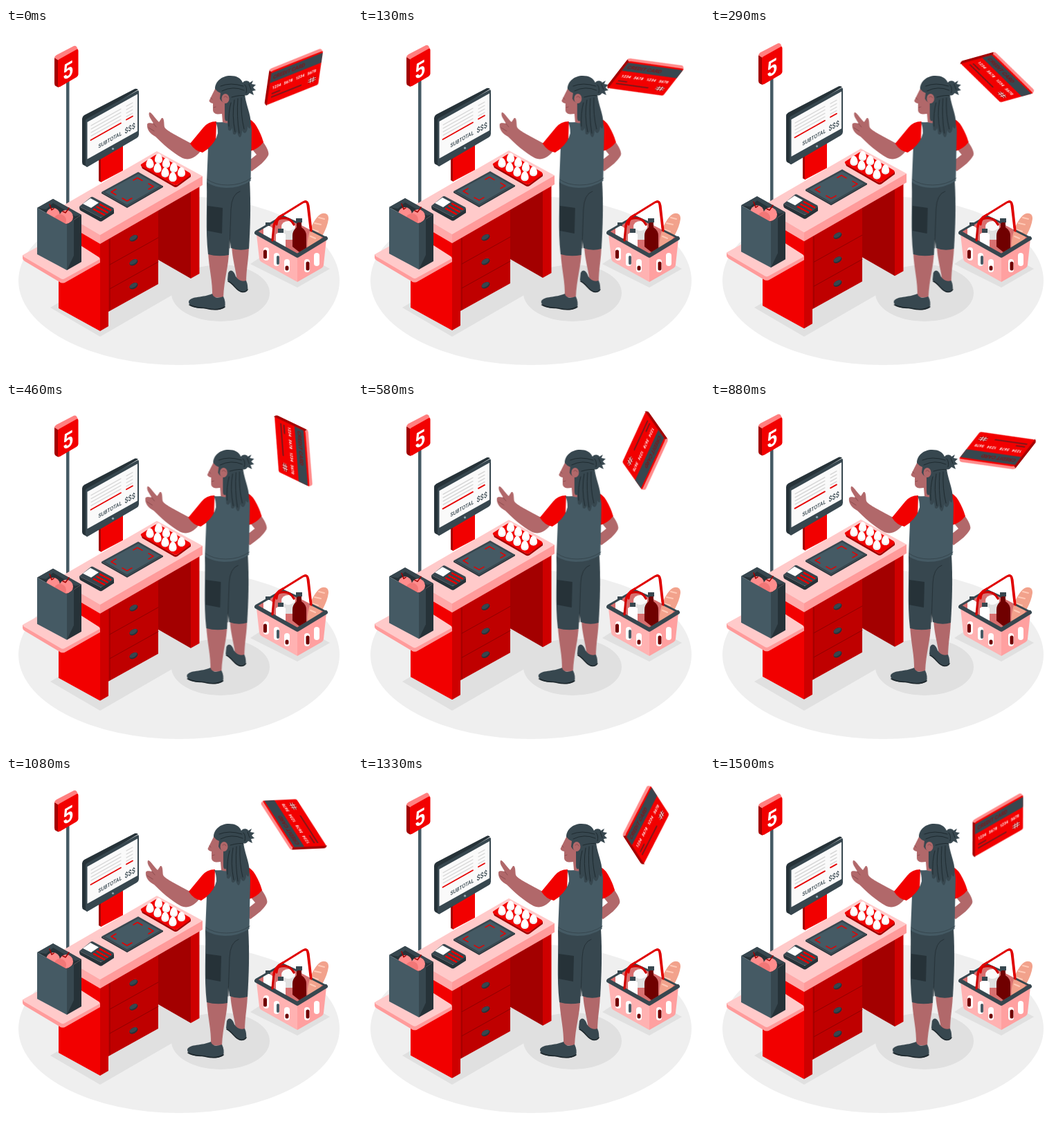
Write an HTML page without scripts that moves like this. It is 500x500 px and loops after 1.54 s.

```html
<!DOCTYPE html>
<html lang="en">
<head>
<meta charset="utf-8">
<title>Checkout</title>
<style>
  html, body { margin: 0; width: 100%; height: 100%; overflow: hidden; background: #fff; }
  svg { display: block; width: 100%; height: 100%; }
  text { font-family: Roboto, "Liberation Sans", sans-serif; }
  .red { fill: #f20000; }
  .deep { fill: #ce0000; }
  .dark { fill: #a30000; }
  .pale { fill: #ffcaca; }
  .pink { fill: #ff9b9b; }
  .slate { fill: #455a64; }
  .steel { fill: #37474f; }
  .ink { fill: #263238; }
  .skin { fill: #b1686a; }
  .shade { fill: #e0e0e0; }
  .white { fill: #fff; }
  .line { fill: none; stroke-linecap: round; stroke-linejoin: round; }
  .desk, .person, .card { animation: 1540ms linear infinite; }
  .desk { animation-name: float; }
  .person { animation-name: sway; }
  .card { animation-name: spin; }
  @keyframes float {
    0%, 100% { transform: translateY(0); }
    8% { transform: translateY(-.9px); }
    18.8% { transform: translateY(-3.7px); }
    29.9% { transform: translateY(-6.2px); }
    46.1% { transform: translateY(-9.2px); }
    52% { transform: translateY(-9.4px); }
    70.1% { transform: translateY(-5px); }
    86.4% { transform: translateY(-1.3px); }
    97.4% { transform: translateY(-.1px); }
  }
  @keyframes sway {
    0%, 100% { transform: translateX(0); }
    18.8% { transform: translateX(1.6px); }
    29.9% { transform: translateX(-2.6px); }
    46.1% { transform: translateX(-4px); }
    70.1% { transform: translateX(-2px); }
    86.4% { transform: translateX(-1px); }
  }
  @keyframes spin {
    0% { transform: rotate(8deg); }
    18.8% { transform: rotate(74deg); }
    29.9% { transform: rotate(115.5deg); }
    46.1% { transform: rotate(176deg); }
    70.1% { transform: rotate(267deg); }
    86.4% { transform: rotate(327deg); }
    97.4% { transform: rotate(360deg); }
    100% { transform: rotate(368deg); }
  }
</style>
</head>
<body>
<svg viewBox="0 0 500 500">
  <defs>
    <g id="egg">
      <path class="white" d="M0-7C3.500-7 5.600-1 5.600 2A5.600 5 0 0 1-5.600 2C-5.600-1-3.500-7 0-7Z"/>
      <path fill="#ececec" d="M-5.400 3.500Q0 7 5.400 3.500A5.600 5 0 0 1-5.400 3.500Z"/>
    </g>
    <g id="eggs">
      <use href="#egg"/><use href="#egg" x="11" y="6.500"/><use href="#egg" x="22" y="13"/><use href="#egg" x="33" y="19.500"/>
    </g>
    <g id="handle" transform="rotate(-30)">
      <ellipse class="ink" cy="1" rx="6.500" ry="4"/>
      <ellipse class="steel" rx="6" ry="3"/>
    </g>
    <g id="slot"><rect class="white" x="-4" y="-9" width="8" height="19" rx="4"/></g>
  </defs>

  <g id="floor">
    <ellipse cx="250" cy="365" rx="232" ry="122" fill="#efefef"/>
    <path class="shade" d="M64 404L136 446L285 360L210 318Z"/>
    <ellipse class="shade" cx="310" cy="383" rx="71" ry="41"/>
    <path class="shade" d="M353 341L421 375L468 348L400 310Z"/>
  </g>

  <g class="desk">
    <!-- lane sign -->
    <path class="slate" d="M87 76h4.500v178h-4.500z"/>
    <path class="dark" d="M70 43L76 46V86L72 84Q70 83 70 80Z"/>
    <path fill="#ff8080" d="M70 43Q70 41 73 39L98 26Q100 25 102 27L104 31L76 47Z"/>
    <path class="red" d="M75 48Q75 46 77 45L102 31Q104.500 30 104.500 33V67Q104.500 69 102 71L78 85Q75 86 75 83Z"/>
    <text class="white" transform="matrix(.866 -.5 0 1 82 76.500)" font-size="31" font-weight="700">5</text>

    <!-- legs and drawers -->
    <path class="dark" d="M220 262L267 235V362L220 335Z"/>
    <path class="deep" d="M267 235L279.500 228V355L267 362Z"/>
    <path fill="#bf0000" d="M148 303L220 262V370L148 410Z"/>
    <path class="line" stroke="#8f0000" d="M150 305V408M150 342L220 303M150 377L220 338"/>
    <use href="#handle" x="0" y="0" transform="translate(184 303)"/>
    <use href="#handle" transform="translate(184 338)"/>
    <use href="#handle" transform="translate(184 372)"/>
    <path class="red" d="M76 272L136 305V438L76 405Z"/>
    <path class="deep" d="M136 305L148 298V431L136 438Z"/>

    <!-- counter -->
    <path class="pale" d="M218 178L284 214L136 299L73 262Z"/>
    <path class="pink" d="M136 299L284 214V227L136 312Z"/>
    <path fill="#ffa9a9" d="M73 262L136 299V312L73 275Z"/>

    <!-- screen -->
    <path class="dark" d="M134 187h4v36l-4-2z"/>
    <path class="red" d="M137 187L169 168V206L137 223Z"/>
    <path class="ink" d="M110 131Q110 128 113 126L186 88Q188 87 191 89L118 134V201L112 198Q110 197 110 194Z"/>
    <path class="steel" d="M115 134Q115 132 117 131L189 91Q192 89 192 92V154Q192 157 189 159L119 200Q115 202 115 198Z"/>
    <path fill="#fafafa" d="M117.500 136L190 95.500V149L117.500 189.500Z"/>
    <circle cx="154.500" cy="174.500" r="1.600" fill="#90a4ae"/>
    <g class="line" stroke="#d5d5d5" stroke-width="1.300">
      <path d="M123 141L166 117M123 146L166 122M123 151L166 127M123 156L166 132M174 113L183 108M174 118L183 113M174 123L183 118M174 128L183 123"/>
      <path stroke="#e60000" stroke-width="1.800" d="M122.500 162L166 137.500M174 132.500L183 127.500"/>
    </g>
    <g class="steel" font-weight="500">
      <text transform="matrix(.866 -.5 0 1 133.500 174)" font-size="8">SUBTOTAL</text>
      <text transform="matrix(.866 -.5 0 1 171.500 153)" font-size="10.400">$$$</text>
    </g>

    <!-- scanner -->
    <path class="ink" d="M138 237L175 258L227 228V230L175 260L138 239Z"/>
    <path class="steel" d="M191 208L227 228.500L175 258.500L138 237Z"/>
    <path class="slate" d="M191 211L222 228.500L175 255.500L143 237Z"/>
    <path class="line" stroke="#e60000" stroke-width="1.500" d="M184 220L190 216.500L197 220.500M206 225L213 229L206 233M182 246L175 250L168 246M159 241L152 237L159 233"/>

    <!-- payment terminal -->
    <path class="ink" d="M106 258L137 274L156 262V268L139 279Q137 280 135 279L108 264Q106 263 106 258Z"/>
    <path class="steel" d="M106 258L122 245Q124 243 127 245L155 260Q157 262 154 264L139 273Q137 274 135 273Z"/>
    <path class="white" d="M111 254L122 246L134 252.500L123 260Z"/>
    <g class="line" stroke="#e60000" stroke-width="2.600" stroke-dasharray="3.600 1.800" stroke-linecap="butt">
      <path d="M136 255L151 263M131.500 258.500L146.500 266.500M127 262L142 270"/>
    </g>

    <!-- egg tray -->
    <path class="dark" d="M195 198L242 226Q245 228 248 226L267 211V215L248 229Q245 231 242 229L197 203Z"/>
    <path class="red" d="M195 197L215 184Q218 182 222 184L265 209Q268 211 265 214L248 226Q245 228 242 226L196 200Q194 198 195 197Z"/>
    <use href="#eggs" x="220.500" y="188.500"/><use href="#eggs" x="208" y="195.500"/>

    <!-- bagging shelf -->
    <path class="pink" d="M24 328L82 361L136 333V339L85 368Q82 369 79 368L27 337Q24 335 24 333Z"/>
    <path class="pale" d="M26 327L77 299Q80 297 84 299L134 331Q137 333 134 335L85 362Q82 364 79 362L26 331Q23 329 26 327Z"/>

    <!-- paper bag -->
    <path class="ink" d="M45 260L68 247L109 270L88 284Z"/>
    <path class="steel" d="M68 247L109 270L100 272L68 253L58 262L45 260Z"/>
    <g fill="#ff8d8d">
      <circle cx="68" cy="270" r="10"/><circle cx="87" cy="273" r="10"/>
      <circle cx="78" cy="278" r="9" fill="#f27777"/>
    </g>
    <path class="line" stroke="#a30000" stroke-width="1.500" d="M66 263L63 255M86 267L91 260M66 263L69 261M86 267L82 265"/>
    <path class="slate" d="M45 260L88 284V350L45 327Z"/>
    <path class="ink" d="M88 284L109 270V338L88 350Z"/>
    <path class="steel" d="M88 284L98 277V329L88 350Z"/>
  </g>

  <g class="person">
    <!-- far leg -->
    <path class="skin" d="M326 312H351C351 334 347 346 347 369L334 366C332 347 327 336 326 312Z"/>
    <path class="steel" d="M321 354C324 348 329 350 332 359Q338 368 347 365Q350 372 349 379C345 384 338 382 334 378C331 372 321 368 320 364Z"/>
    <path class="line" stroke="#1c262b" stroke-width="1.500" d="M321 366C330 370 333 381 342 381.500Q347 381.500 349 378"/>
    <path class="steel" d="M314 224L352 220C354 254 353 286 351 319Q338 323 325 318Z"/>
    <!-- near leg -->
    <path class="skin" d="M292 322H322C322 344 315 362 314 390L298 389C299 366 293 348 292 322Z"/>
    <path class="steel" d="M298 384Q301 393 314 388Q318 396 316 404C308 409 296 407 286 405C276 406 263 402 264 395C268 387 285 390 298 384Z"/>
    <path class="line" stroke="#1c262b" stroke-width="1.500" d="M265 400C275 406 284 403 291 405.500Q306 409 316 403"/>
    <path class="steel" d="M290 223H340C338 240 326 244 325 262L322 328Q306 331 292 327C288 290 291 258 290 223Z"/>
    <path class="line" stroke="#263238" d="M338 236Q326 240 325 262L323 318"/>
    <path class="ink" d="M291 257L313 260L312 297L291 293Z"/>
    <!-- far arm -->
    <path class="skin" d="M353 172L371 164Q381 178 379 184C374 193 366 199 355 207L352 204V191L362 183Z"/>
    <path class="red" d="M347 130Q356 132 362 142Q369 154 372 165Q364 175 353 178Z"/>
    <!-- near arm -->
    <path class="skin" d="M207 122C210 121 214 129 221 136L225 130C229 129 228 138 229 143C231 148 244 154 268 167L281 178C272 190 262 191 255 188C240 180 225 166 216 157C208 153 203 146 204 139C206 136 210 138 213 138C210 132 205 127 207 122Z"/>
    <path class="line" stroke="#8e4d50" d="M206 144L214 149M213 138L217 143"/>
    <path class="red" d="M304 135Q292 135 285 144L266 167Q273 178 284 180L303 167Z"/>
    <!-- torso -->
    <path class="slate" d="M303 136Q320 138 347 129Q355 136 355 148L353.500 221Q338 231 318 231Q300 230 290 223L292 174Q303 165 306 152Q306 142 303 136Z"/>
    <path class="line" stroke="#37474f" d="M291 219Q302 227 320 227Q340 227 354 217"/>
    <!-- head -->
    <path class="skin" d="M304 84L299 94L293.500 105Q294 108 299 109L299 119C300 125 306 125 312 124L313 136Q322 140 330 134L336 90Z"/>
    <path class="steel" d="M302 88C302 77 312 69 324 69C333 69 339 72 342 79C345 75 351 76 352 79L357 76L355 81L361 82L357 86L361 90L356 91L358 97L352 94Q348 99 345 97C348 116 356 130 353 143Q352 148 349 142Q349 150 345 152Q342 151 341 147Q341 156 338 158Q335 157 334 149Q332 156 328 153L327 144Q324 151 321 147L320 134Q316 136 316 129L316 108Q311 107 309 102L310 94Q305 92 302 88Z"/>
    <ellipse class="skin" cx="317" cy="102" rx="5.500" ry="7"/>
    <path class="line" stroke="#8e4d50" d="M315 100Q318 97 320 101M296 101L298 103M300 115L303 114"/>
    <g class="line" stroke="#1f2b30">
      <path d="M310 84Q324 78 343 84M312 91Q328 83 344 90M326 100Q340 96 345 98M325 108Q321 122 322 142M330 104Q326 126 331 150M335 102Q333 128 337 152M340 101Q339 126 344 146M345 82Q349 86 347 94M351 81L354 89"/>
    </g>
  </g>

  <g id="basket">
    <path fill="#d86f6f" d="M361 295L402 272L463 304L421 330Z"/>
    <path class="line" stroke="#e00000" stroke-width="3" d="M391 284Q392 274 400 270L429 252Q435 248 436 256L440 290"/>
    <ellipse cx="408" cy="287" rx="10" ry="8" fill="#fafafa"/>
    <path fill="#e0e0e0" d="M398 288Q408 298 418 288V306H398Z"/>
    <path fill="#f2a28c" d="M436 319C434 304 441 283 450 273C456 265 467 266 466 276C464 291 454 307 444 320Z"/>
    <path class="line" stroke="#ffc9b6" stroke-width="2" d="M446 282L455 284M442 291L451 294M440 301L447 304M452 274L460 276"/>
    <path fill="#700000" d="M420 276H427V288Q434 293 434 300V318L424 324L414 316V300Q414 293 420 288Z"/>
    <path class="steel" d="M419 275h9v6h-9z"/>
    <path class="white" d="M390 298Q397 291 404 298V318H390ZM372 289Q378 282 385 289V304H372Z"/>
    <path class="steel" d="M393 290h8v6h-8zM375 281h7v5h-7z"/>
    <path fill="#ffb2b2" d="M362 298L421 331V367L369 338Q366 336 366 333Z"/>
    <path fill="#ffa0a0" d="M421 331L463 305L459 342Q459 345 456 347L421 367Z"/>
    <use href="#slot" x="376" y="326"/><use href="#slot" x="391" y="334"/><use href="#slot" x="406" y="343"/>
    <use href="#slot" x="435" y="343"/><use href="#slot" x="449" y="334"/>
    <g class="line" stroke-width="4">
      <path stroke="#455a64" d="M393 331V340"/>
      <path stroke="#700000" stroke-width="5" d="M374.500 323V331M406 346V348M436 340V348"/>
    </g>
    <path class="line" stroke="#37474f" stroke-width="6" d="M362 296L421 329L462 304"/>
    <path class="line" stroke="#37474f" stroke-width="3" d="M362 294L400 272L420 281M440 292L462 303"/>
    <path class="line" stroke="#cf0000" stroke-width="3.200" d="M385 307L387 287Q388 276 398 275Q410 273 416 284"/>
    <path class="line" stroke="#e00000" stroke-width="3.200" d="M387 287Q389 275 400 270M432 251Q436 250 437 257L441 293"/>
  </g>

  <g transform="translate(415.500 70.500)">
    <g class="card">
      <path class="dark" d="M-36-4L-32-3V47L-34.500 45.500Q-36 44-36 42Z"/>
      <path fill="#ff8b8b" d="M-36-4Q-36-6-33.500-7.500L31-45Q33-46.500 36-43.500L-32-2.500Z"/>
      <g transform="matrix(.866 -.5 0 1 -32.500 -3.500)">
        <rect class="red" width="80" height="49.500" rx="2"/>
        <rect class="steel" y="3" width="80" height="14.500"/>
        <text x="4" y="13.200" font-size="8" font-weight="700" fill="#7d1518">CREDIT CARD</text>
        <text class="white" x="5" y="28.500" font-size="6" font-weight="700" word-spacing="3">1234 5678 1234 5678</text>
        <path class="line" stroke="#6d1a1d" stroke-width="1.800" d="M6 35H18M6 40H52"/>
        <rect x="63" y="35" width="11" height="7" class="dark"/>
        <path class="line" stroke="#fff" stroke-width=".8" d="M63 37H74M63 40H74M66.500 35V42M70.500 35V42"/>
      </g>
    </g>
  </g>
</svg>
</body>
</html>
```
